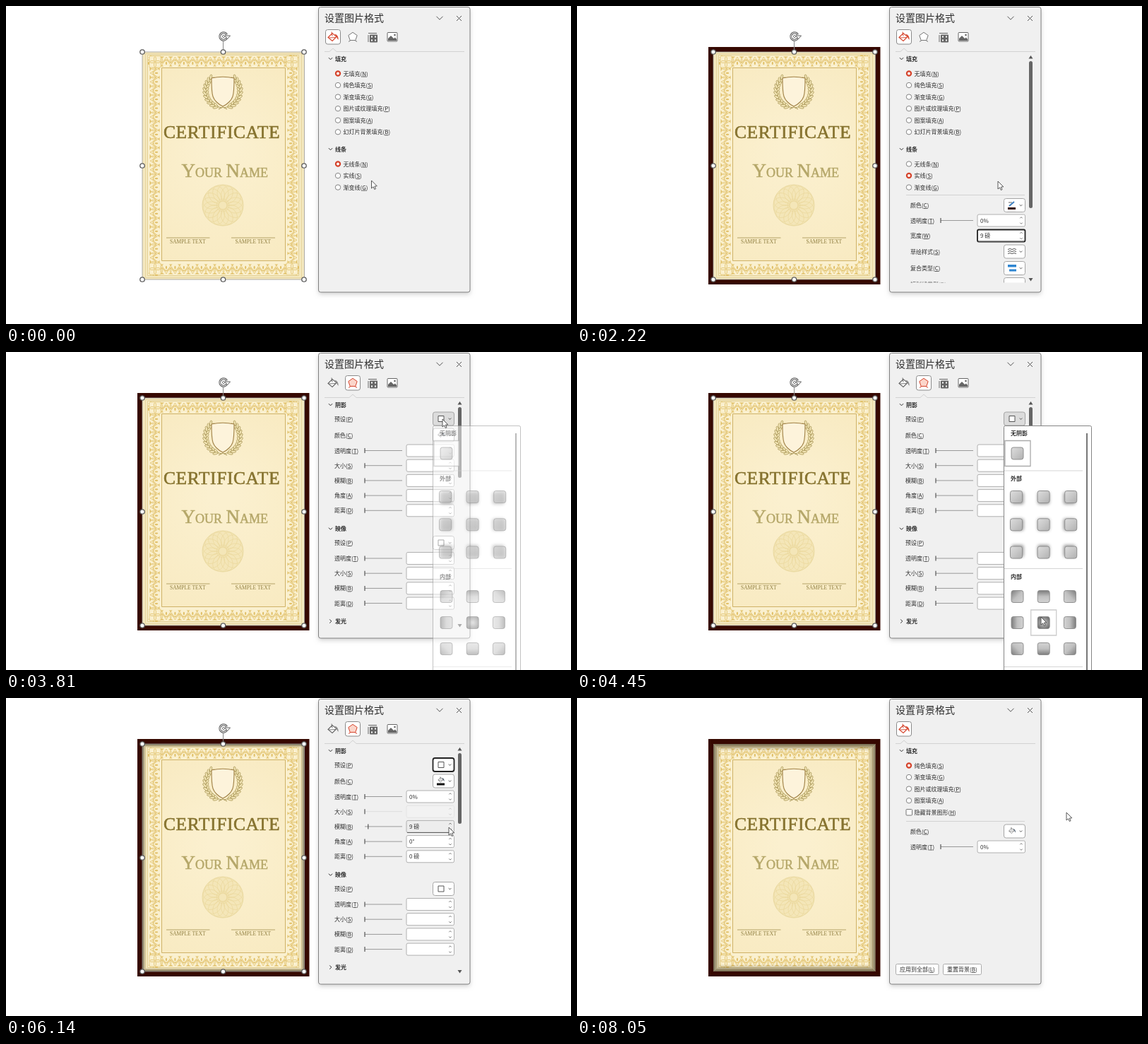
These frames come from a looping animation (800 by 450 pixels, 8950 ms). An HTML page with a canvas:

```html
<!DOCTYPE html>
<html lang="zh">
<head>
<meta charset="utf-8">
<style>
html, body { margin: 0; width: 100%; height: 100%; overflow: hidden; background: #fff; }
canvas { display: block; width: 800px; height: 450px; }
</style>
</head>
<body>
<canvas id="stage" width="800" height="450"></canvas>
<script>
const c = document.getElementById('stage').getContext('2d');
const LOOP = 8950, STEP = 106;
const SANS = '"Noto Sans CJK SC", "Noto Sans CJK", sans-serif', SERIF = '"Liberation Serif", serif';
const RED = '#d5442c', INK = '#2d2d2d', GREY = '#777', GOLD = '#e0bf66', OLIVE = '#a3904f';

// Steps at which the interface reacts.
const SOLID = 6, FOCUS_WIDTH = 17, EFFECTS = 27, POPUP = 36, SHADOW = 52, SPIN = 61, DESELECT = 75;
const POINTER = [
  [0, 517.5, 247], [4, 487, 236], [9, 487, 236], [17, 620, 325], [19, 620, 325], [21, 596, 248],
  [24, 491, 44], [28, 491, 44], [30, 510, 43], [35, 618, 95], [36, 618, 95], [42, 657, 375],
  [51, 657, 375], [58, 627, 183], [69, 627, 183], [74, 693, 162], [99, 693, 162]
];

const clamp = v => Math.max(0, Math.min(1, v));

function pointerAt(step) {
  const i = POINTER.findIndex(k => k[0] > step);
  const [s0, x0, y0] = POINTER[i - 1], [s1, x1, y1] = POINTER[i];
  const u = (step - s0) / (s1 - s0);
  return [x0 + (x1 - x0) * u, y0 + (y1 - y0) * u];
}

function paint(fill, stroke, width = 1) {
  if (fill) { c.fillStyle = fill; c.fill(); }
  if (stroke) { c.strokeStyle = stroke; c.lineWidth = width; c.stroke(); }
}

function box(x, y, w, h, fill, stroke, radius = 0, width = 1) {
  c.beginPath();
  c.roundRect(x, y, w, h, radius);
  paint(fill, stroke, width);
}

function poly(points, stroke, width = 1, fill, close = !!fill) {
  c.beginPath();
  for (let i = 0; i < points.length; i += 2) c.lineTo(points[i], points[i + 1]);
  if (close) c.closePath();
  paint(fill, stroke, width);
}

function oval(x, y, rx, ry, angle, fill, stroke, width) {
  c.beginPath();
  c.ellipse(x, y, rx, ry, angle, 0, Math.PI * 2);
  paint(fill, stroke, width);
}

function within(draw, x = 0, y = 0, angle = 0) {
  c.save();
  c.translate(x, y);
  c.rotate(angle);
  draw();
  c.restore();
}

function text(s, x, y, font, color, { spacing = 0, outline = 0 } = {}) {
  c.font = font;
  c.letterSpacing = spacing + 'px';
  c.fillStyle = c.strokeStyle = color;
  c.fillText(s, x, y);
  c.lineWidth = outline;
  if (outline) c.strokeText(s, x, y);
  const width = c.measureText(s).width;
  c.letterSpacing = '0px';
  return width;
}

// Label centred on y, with an underlined access key in brackets.
function label(s, x, y, color = INK, weight = 400) {
  text(s, x, y + 3, `${weight} 8px ${SANS}`, color);
  const open = s.indexOf('(');
  if (open < 0) return;
  const from = x + c.measureText(s.slice(0, open + 1)).width;
  poly([from, y + 4.5, from + c.measureText(s[open + 1]).width, y + 4.5], color, .8);
}

// ---------- certificate ----------

function borderSide(length) {
  const n = Math.round(length / 12.2), pitch = length / n;
  for (let i = 0; i < n; i++) within(() => {
    poly([-pitch / 2, 2, 0, 14, pitch / 2, 2], GOLD, .7);
    for (const a of [-.8, 0, .8])
      within(() => oval(0, -3.8, .9, 3.2, 0, null, GOLD, .7), 0, 11, a);
    poly([-3.5, 1.5, 3.5, 1.5, 0, 4], null, 1, GOLD);
    oval(-pitch / 2, 11, 1.1, 2.3, 0, GOLD);
    oval(-pitch / 2, 6.5, .7, 1.2, 0, GOLD);
    poly([-2.5, 15.5, 2.5, 15.5, 0, 13.5], null, 1, GOLD);
  }, (i + .5) * pitch, 0);
}

function crest() {
  for (const side of [-1, 1]) within(() => {
    c.scale(side, 1);
    c.beginPath();
    c.ellipse(0, 120, 24, 24, 0, -.7, 1.5);
    paint(null, OLIVE, .8);
    for (let i = 0; i < 11; i++) {
      const a = -.75 + i * .2, x = 24 * Math.cos(a), y = 120 + 24 * Math.sin(a);
      for (const turn of [-.55, .55])
        within(() => oval(0, -3, 1.5, 3.8, 0, '#f5e8b9', OLIVE, .7), x, y, a + turn);
    }
    poly([0, 143, 6, 146], OLIVE, 1);
  }, 307);
  c.beginPath();
  c.moveTo(291, 102);
  c.quadraticCurveTo(307, 98.5, 323, 102);
  c.bezierCurveTo(323, 126, 323, 134, 307, 142);
  c.bezierCurveTo(291, 134, 291, 126, 291, 102);
  paint('#fdf3db', '#a08146', 1.1);
}

function certificate(blur) {
  box(193, 65, 229.5, 322, '#f4e8bf');
  box(197.5, 67.5, 221, 317, null, '#e3d096', 0, .8);
  box(200.5, 69.5, 214, 312, '#faf0cf', '#dfc98a', 0, .8);
  const corners = [[202, 70], [414, 70], [414, 381], [202, 381]];
  corners.forEach(([x, y], i) => within(() => borderSide(i % 2 ? 311 : 212), x, y, i * Math.PI / 2));
  for (const x of [211, 405]) for (const y of [79, 372]) {
    box(x - 8, y - 8, 16, 16, '#faf0cf', GOLD, 0, .6);
    for (let i = 0; i < 4; i++)
      within(() => oval(0, -4, 1.5, 3.4, 0, null, GOLD, .8), x, y, i * Math.PI / 2);
  }
  const paper = c.createRadialGradient(307, 200, 20, 307, 225, 170);
  paper.addColorStop(0, '#fbf0cf');
  paper.addColorStop(1, '#f8eac1');
  box(220.5, 87.5, 175, 273, paper, '#cfb267', 0, 1);
  crest();

  text('CERTIFICATE', 223, 187, '25.5px ' + SERIF, '#86732f', { spacing: .6, outline: .6 });
  let x = 248.5;
  for (const [s, size] of [['Y', 27], ['OUR', 18], [' ', 22], ['N', 27], ['AME', 18]])
    x += text(s, x, 241.5, size + 'px ' + SERIF, '#b5a769', { outline: .5 });

  oval(307, 282, 29, 29, 0, '#f4e6b8', '#eadaa2', 1);
  for (let i = 0; i < 18; i++)
    within(() => oval(0, -17, 8, 11.5, 0, null, '#ead79a', .6), 307, 282, i * Math.PI / 9);
  oval(307, 282, 9, 9, 0, null, '#ead79a', .6);

  poly([227, 328, 288.5, 328], OLIVE, .8);
  poly([319, 328, 381, 328], OLIVE, .8);
  for (const left of [232, 324.5]) text('SAMPLE TEXT', left, 336, '7.5px ' + SERIF, '#8f7e40');

  const depth = blur * .6;
  for (let i = 0; i < depth; i++)
    box(193.5 + i, 65.5 + i, 228.5 - 2 * i, 321 - 2 * i, null, `rgba(30,22,8,${.58 * (1 - i / depth) ** 1.6})`);
}

function handles() {
  poly([307.5, 50, 307.5, 62], '#888', 1);
  box(193, 65, 229.5, 322, null, '#999', 0, .8);
  for (const x of [193, 307.5, 422]) for (const y of [65, 226, 387])
    if (x !== 307.5 || y !== 226) oval(x, y, 3.2, 3.2, 0, '#fff', '#5a5a5a', 1.3);
  for (const [color, width] of [['#606060', 3], ['#fff', 1]]) {
    c.beginPath();
    c.arc(308, 43, 5.2, .5, 5.8);
    paint(null, color, width);
  }
  poly([310, 42, 317.5, 42, 313.5, 46.5], '#606060', 1, '#fff');
  oval(308, 43, 1.6, 1.6, 0, null, '#777', 1);
}

// ---------- panel ----------

function chevron(x, y, size, color = '#555', dir = 0) {
  within(() => poly([-size, -size / 2, 0, size / 2, size, -size / 2], color, 1), x, y, dir);
}

function bucket(x, y, scale, color, drop) {
  within(() => {
    c.scale(scale, scale);
    poly([-7, 1, -1, -5, 5, 0, -1, 6], color, 1.1, '#fff');
    poly([-2, -7, -1, -1], color, 1);
    poly([-6, 1.5, 4, 1], color, .9);
    c.beginPath();
    c.moveTo(2, -4);
    c.quadraticCurveTo(8, -3, 7.5, 4.5);
    c.quadraticCurveTo(6, 3, 5, 0);
    paint(drop);
  }, x, y);
}

function tabs(selected, focused, px, py) {
  const hot = x => Math.abs(px - x) < 10 && py > 32 && py < 55;
  const x = selected ? 491 : 463;
  box(x - 10.5, 33.5, 21, 20.5, '#fff', focused ? '#222' : '#8a8a8a', 3, focused ? 1.7 : 1);
  poly([451, 64.5, x - 5, 64.5, x, 60, x + 5, 64.5, 649, 64.5], '#d2d2d2');
  return { pentagon() {
    const color = selected || hot(491) ? RED : '#777', points = [];
    for (let i = 0; i < 5; i++) {
      const a = i * Math.PI * .4 - Math.PI / 2;
      points.push(491 + 6.5 * Math.cos(a), 43.5 + 6.2 * Math.sin(a));
    }
    poly(points, color, 1, selected ? '#fbd5ca' : '#fff');
    poly([485, 50.5, 488, 48.5], color, 1);
    poly([497, 50.5, 494, 48.5], color, 1);
  }, size() {
    const color = hot(519) ? RED : '#666';
    if (hot(519)) box(508.5, 33.5, 21, 20.5, '#fff');
    poly([513, 38.5, 525, 38.5], color, 1);
    poly([513, 41, 513, 51], color, 1);
    box(515.5, 41, 10, 10, color, color);
    for (const [x, y] of [[518, 43.5], [523, 43.5], [518, 48.5], [523, 48.5]]) box(x - 1, y - 1, 2, 2, '#fff');
  }, picture() {
    const color = hot(547) ? RED : '#666';
    box(540, 37.5, 14, 12.5, '#fff', color, 1);
    poly([541, 49, 541, 46, 545, 42, 549, 46, 551, 44.5, 553, 47, 553, 49], null, 1, color);
    oval(550.5, 41, 1.3, 1.3, 0, color);
  } };
}

function header(s, y, open = true) {
  chevron(459.5, y, 2.6, INK, open ? 0 : -Math.PI / 2);
  label(s, 466, y, INK, 700);
}

function radios(names, top, chosen) {
  names.forEach((name, i) => {
    const y = top + i * 16.55, on = i === chosen;
    oval(470, y, on ? 3.1 : 3.7, on ? 3.1 : 3.7, 0, '#fff', on ? RED : GREY, on ? 2.2 : .9);
    label(name, 477.5, y);
  });
}

function slider(x, y, value = 0, color = '#999') {
  poly([x, y, 561, y], color, 1);
  const knob = x + value * (561 - x);
  poly([knob, y - 3.5, knob, y + 3.5], '#555', 1.2);
}

function field(y, value = '', { focus = false, hot = false, off = false } = {}) {
  const line = focus ? '#222' : off ? '#e4e4e4' : '#b0b0b0';
  box(567, y - 8.5, 67.5, 17, off ? '#f2f2f2' : hot ? '#ededed' : '#fff', line, 2, focus ? 1.8 : 1);
  if (focus || hot) poly([568, y + 8.5, 633, y + 8.5], '#555', 1);
  chevron(629, y - 4, 1.7, off ? '#ccc' : '#777', Math.PI);
  chevron(629, y + 4, 1.7, off ? '#ccc' : '#777');
  label(value, 571, y);
}

function button(y, icon, { focus = false, pressed = false } = {}) {
  box(604.5, y - 9.5, 30, 19, pressed ? '#dcdcdc' : '#fff', focus ? '#222' : '#a5a5a5', 3, focus ? 1.8 : 1);
  chevron(628.5, y, 1.8);
  icon(616, y);
}

const icons = {
  pen(x, y) {
    poly([x - 4, y + 1, x + 3, y - 5], '#3d7fc0', 2);
    poly([x - 5, y - 4, x, y - 4], '#666', 1);
    box(x - 6, y + 3, 11, 3, '#360800');
  },
  sketch(x, y) {
    for (const d of [-3, 0, 3]) poly([x - 6, y + d, x - 3, y + d - 1, x, y + d, x + 3, y + d - 1, x + 6, y + d], '#555');
  },
  compound(x, y) {
    box(x - 6, y - 5, 12, 3.5, '#2f86d1');
    box(x - 4, y + 1.5, 10, 3, '#2f86d1');
  },
  dash(x, y) { poly([x - 6, y - 1, x + 6, y - 1], '#555'); },
  square(x, y) { box(x - 4, y - 4, 8, 8, '#fff', '#555'); },
  fill(x, y) { bucket(x, y - 1, .65, '#666', '#456'); },
  black(x, y) { bucket(x, y - 2, .6, '#555', '#456'); box(x - 6, y + 3, 11, 3, '#111'); }
};

function scrollbar(bottom) {
  poly([639.5, 74.5, 645.5, 74.5, 642.5, 70], null, 1, '#555');
  poly([639.5, 385, 645.5, 385, 642.5, 389.5], null, 1, '#555');
  box(640, 78, 5, bottom - 78, '#666', null, 2.5);
}

const FILLS = ['纯色填充(S)', '渐变填充(G)', '图片或纹理填充(P)', '图案填充(A)'];

function linePage(step) {
  const solid = step >= SOLID;
  header('填充', 74.5);
  radios(['无填充(N)', ...FILLS, '幻灯片背景填充(B)'], 95.5, 0);
  header('线条', 202.5);
  radios(['无线条(N)', '实线(S)', '渐变线(G)'], 223.5, solid ? 1 : 0);
  if (!solid) return;
  poly([466, 267.5, 634, 267.5], '#d2d2d2');
  ['颜色(C)', '透明度(T)', '宽度(W)', '草绘样式(S)', '复合类型(C)', '短划线类型(D)']
    .forEach((s, i) => label(s, 472, [282, 303.5, 325, 347.5, 371, 394][i]));
  slider(515, 303.5);
  field(303.5, '0%');
  field(325, '9 磅', { focus: step >= FOCUS_WIDTH });
  button(282, icons.pen);
  button(347.5, icons.sketch);
  button(371, icons.compound);
  button(394, icons.dash);
}

function effectsPage(step, blur) {
  const on = blur > 0, spinning = step >= SPIN;
  header('阴影', 74.5);
  label('预设(P)', 465, 94.5);
  label('颜色(C)', 465, 118);
  button(94.5, icons.square, { focus: on && !spinning, pressed: step >= POPUP && !on });
  button(117.5, on ? icons.black : icons.fill);
  const rows = [['透明度(T)', '0%'], ['大小(S)', ''], ['模糊(B)', blur + ' 磅'], ['角度(A)', '0°'], ['距离(D)', '0 磅']];
  rows.forEach(([name, value], i) => {
    const y = 139.5 + i * 21.2, off = on && i === 1;
    label(name, 465, y);
    slider(508, y, i === 2 ? blur / 100 : 0, off ? '#ddd' : '#999');
    field(y, on ? value : '', { off, hot: i === 2 && step >= 58 && step < 70, focus: i === 2 && spinning });
  });
  header('映像', 250);
  label('预设(P)', 465, 270);
  button(270, icons.square);
  ['透明度(T)', '大小(S)', '模糊(B)', '距离(D)'].forEach((name, i) => {
    const y = 292 + i * 21.2;
    label(name, 465, y);
    slider(508, y);
    field(y);
  });
  header('发光', 381, false);
}

function backgroundPage() {
  header('填充', 74.5);
  radios(FILLS, 95.5, 0);
  box(466, 157.5, 8.5, 8.5, '#fff', GREY, 1);
  label('隐藏背景图形(H)', 477.5, 161.5);
  poly([466, 174.5, 634, 174.5], '#d2d2d2');
  label('颜色(C)', 472, 188.5);
  button(188.5, icons.fill);
  label('透明度(T)', 472, 210.5);
  slider(515, 210.5);
  field(210.5, '0%');
  box(451.5, 376.5, 60.5, 15, '#fff', '#aaa', 2);
  label('应用到全部(L)', 457, 384);
  box(518.5, 376.5, 54, 15, '#fff', '#aaa', 2);
  label('重置背景(B)', 524, 384);
}

function panel(step, blur, px, py) {
  const background = step >= DESELECT, effects = step >= EFFECTS && !background;
  within(() => {
    c.shadowColor = 'rgba(0,0,0,.18)';
    c.shadowBlur = 6;
    c.shadowOffsetY = 3;
    box(442.5, 1.5, 214.5, 403.5, '#f0f0f0', null, 3);
  });
  box(442.5, 1.5, 214.5, 403.5, null, '#808080', 3);
  text(background ? '设置背景格式' : '设置图片格式', 451, 22, '14px ' + SANS, INK);
  chevron(614, 17, 4.5);
  poly([638, 14, 645, 21], '#555');
  poly([645, 14, 638, 21], '#555');

  const tab = tabs(effects, effects && step < POPUP, px, py);
  bucket(463, 43.5, 1, effects ? '#666' : RED, effects ? '#888' : RED);
  if (background) return backgroundPage();
  tab.pentagon();
  tab.size();
  tab.picture();
  if (step >= SOLID) scrollbar(effects ? 178 : 286);
  within(() => {
    c.beginPath();
    c.rect(444, 66, effects && step < 32 ? 193 : 195, 325.5);
    c.clip();
    if (!effects) return linePage(step);
    const shown = clamp((step - EFFECTS) / 5);
    c.globalAlpha = shown ** 1.4;
    c.translate(25 * (1 - shown), 0);
    effectsPage(step, blur);
  });
}

// ---------- shadow gallery ----------

function swatch(x, y, col, row, inner) {
  within(() => {
    const centre = col === 1 && row === 1;
    let fill = c.createLinearGradient(-8, -8, 8, 8), stops = ['#dcdcdc', '#c8c8c8', '#b2b2b2'];
    if (inner && centre) {
      fill = c.createRadialGradient(0, 0, 1, 0, 0, 11);
      stops = ['#c4c4c4', '#939393', '#626262'];
    } else if (inner) {
      fill = c.createLinearGradient((col - 1) * 9, (row - 1) * 9, (1 - col) * 9, (1 - row) * 9);
      stops = ['#777', '#c0c0c0', '#d4d4d4'];
    }
    stops.forEach((color, i) => fill.addColorStop(i / 2, color));
    if (!inner && col !== undefined) {
      c.shadowColor = 'rgba(0,0,0,.4)';
      c.shadowBlur = 4;
      c.shadowOffsetX = (1 - col) * 2;
      c.shadowOffsetY = (1 - row) * 2;
    }
    box(-8.5, -8.5, 17, 17, fill, null, 3);
    c.shadowColor = 'transparent';
    box(-8.5, -8.5, 17, 17, null, '#909090', 3);
  }, x, y);
}

function gallery(step, px, py) {
  c.globalAlpha = step === POPUP ? .5 : 1;
  box(604.5, 104.5, 124, 360, '#fff', '#858585', 2);
  label('无阴影', 614, 114.5, INK, 700);
  box(606, 125.5, 36, 36, '#fff', '#aaa', 0, 1.3);
  swatch(623.5, 143.5);
  for (const y of [168, 306.5, 445.5]) poly([605, y, 716, y], '#d5d5d5');
  label('外部', 614, 179, INK, 700);
  label('内部', 614, 317.5, INK, 700);
  for (let row = 0; row < 3; row++) for (let col = 0; col < 3; col++) {
    const x = 623.5 + col * 37.2, y = 346 + row * 37;
    if (Math.abs(px - x) < 18 && Math.abs(py - y) < 18)
      box(x - 18, y - 18, 36, 36, step >= 47 ? '#eee' : '#fff', '#ccc', 0, 1.3);
    swatch(622 + col * 38.6, 205 + row * 39.3, col, row, false);
    swatch(x, y, col, row, true);
  }
  box(721, 115, 2, 340, '#777');
  c.globalAlpha = 1;
}

function pointer(x, y) {
  within(() => poly([0, 0, 0, 11, 2.6, 8.8, 4.3, 12.5, 6, 11.7, 4.4, 8.1, 7.8, 7.8], '#444', .9, '#fff'), x, y);
}

function draw(step) {
  const [px, py] = pointerAt(step);
  const blur = step < SHADOW ? 0 : 9 + Math.max(0, Math.min(9, step - SPIN + 1));
  c.fillStyle = '#fff';
  c.fillRect(0, 0, 800, 450);
  if (step >= SOLID) box(186, 58, 243.5, 336, '#360800');
  certificate(blur);
  if (step < DESELECT) handles();
  panel(step, blur, px, py);
  if (step >= POPUP && step < SHADOW) gallery(step, px, py);
  pointer(px, py);
}

let last = -1;
function tick(now) {
  const step = Math.floor((now % LOOP + 12) / STEP);
  if (step !== last) draw(last = step);
  requestAnimationFrame(tick);
}
requestAnimationFrame(tick);
</script>
</body>
</html>
```
